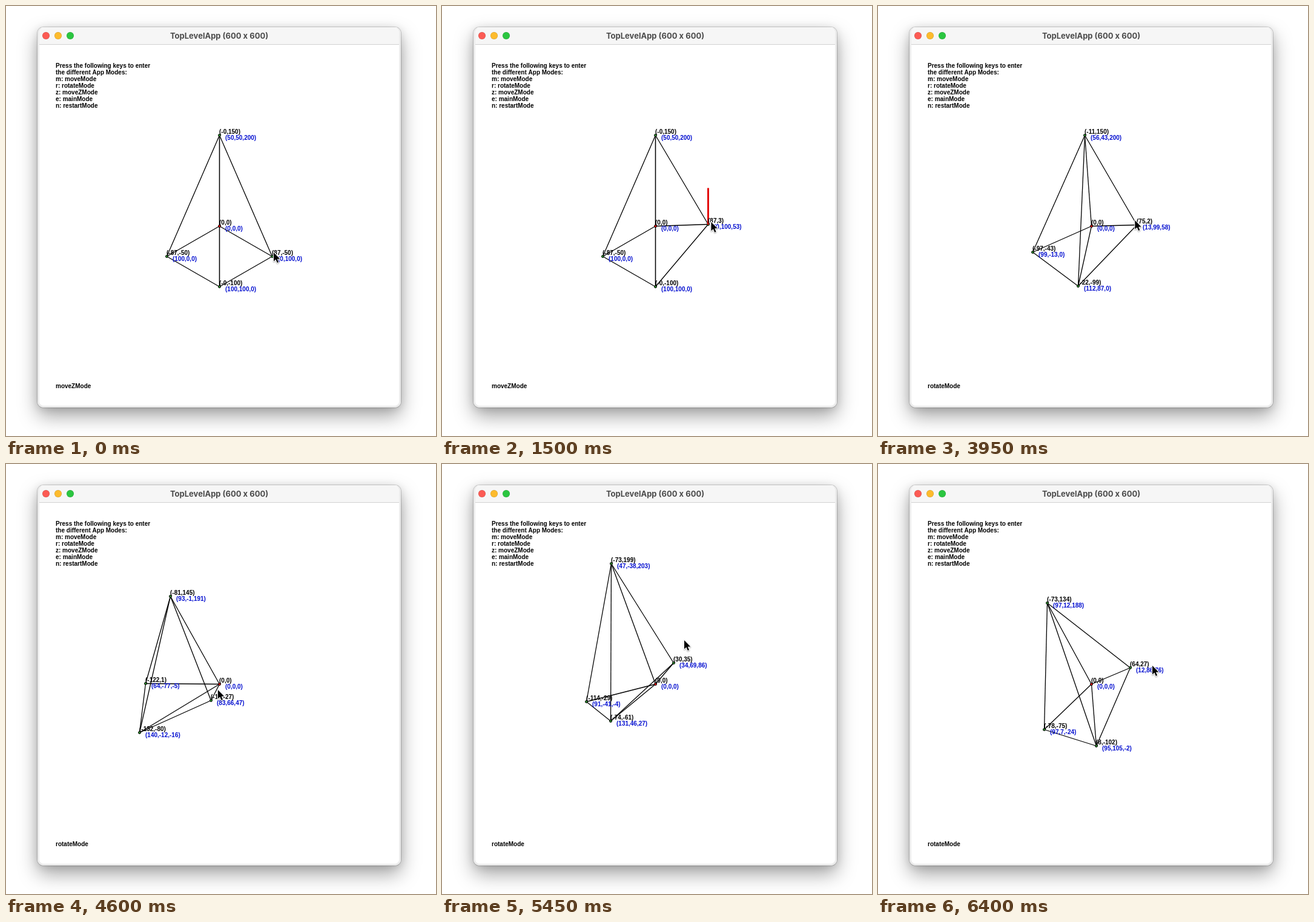
An HTML page with a canvas that plays this animation: 710 px wide and 710 px high, repeating every 6450 ms.

```html
<!DOCTYPE html>
<html lang="en">
<head>
<meta charset="utf-8">
<title>TopLevelApp</title>
<style>
  html, body { margin: 0; width: 100%; height: 100%; overflow: hidden; background: #fff; }
  #win, #shade {
    position: absolute; left: 52px; top: 35px; width: 600px; height: 628px;
    box-sizing: border-box; border-radius: 10px;
  }
  #win { overflow: hidden; border: 3px solid #ececec; border-top: 0; background: #fff; }
  #shade {
    box-shadow: 0 0 0 1px rgba(0,0,0,.16), 0 14px 32px rgba(0,0,0,.36), 0 2px 14px rgba(0,0,0,.12);
  }
  #bar {
    position: absolute; left: -3px; top: 0; width: 600px; height: 29px; box-sizing: border-box;
    background: #f6f6f6; border-bottom: 1px solid #d2d2d2; text-align: center;
    font: 700 13px/28px Inter, "Open Sans", sans-serif; color: #4b4b4b;
  }
  #bar i {
    position: absolute; top: 8px; width: 12px; height: 12px; border-radius: 50%;
    box-shadow: inset 0 0 0 .5px rgba(0,0,0,.2);
  }
  canvas { position: absolute; left: 0; top: 0; width: 710px; height: 710px; }
</style>
</head>
<body>
<div id="shade"></div>
<div id="win">
  <div id="bar">
    <i style="left:8px;background:#fc5b54"></i>
    <i style="left:28px;background:#fdbb2d"></i>
    <i style="left:48px;background:#2bc640"></i>
    TopLevelApp (600 x 600)
  </div>
</div>
<canvas id="stage" width="710" height="710"></canvas>
<script>
const ctx = document.getElementById('stage').getContext('2d');
const LOOP = 6450, STEP = 50, TURN_START = 3950;
const OX = 352.5, OY = 363.5, COS30 = Math.sqrt(3) / 2;
const BLACK = '#000', BLUE = '#0510d0';

const HELP = [
  'Press the following keys to enter', 'the different App Modes:',
  'm: moveMode', 'r: rotateMode', 'z: moveZMode', 'e: mainMode', 'n: restartMode'
];

// Vertices: origin, left, right, front, apex; every pair but left-right is joined
const EDGES = [];
for (let i = 0; i < 5; i++)
  for (let j = i + 1; j < 5; j++)
    if (i !== 1 || j !== 2) EDGES.push([i, j]);

// Key poses of the drag: time, yaw, tilt x, tilt y, mouse y
const DRAG = [
  [TURN_START, -0.127, 0, 0, 354],
  [4600, -0.871, 0.114, 0.027, 373],
  [4850, -0.95, 0.13, 0.02, 378],
  [5450, -0.425, -0.092, -0.302, 291],
  [6000, 0.17, 0.13, -0.27, 297],
  [6400, 0.044, 0.245, -0.2005, 333]
];

const clamp = u => Math.min(1, Math.max(0, u));

// Slope at key i, flat at turning points and ends
function slope(keys, i, k) {
  const a = keys[i - 1], b = keys[i], c = keys[i + 1];
  if (!a || !c || (b[k] - a[k]) * (c[k] - b[k]) <= 0) return 0;
  return (c[k] - a[k]) / (c[0] - a[0]);
}

// Smooth cubic through the keys
function track(keys, t) {
  let i = 0;
  while (i < keys.length - 2 && keys[i + 1][0] < t) i++;
  const p = keys[i], q = keys[i + 1], d = q[0] - p[0];
  const u = clamp((t - p[0]) / d), v = 1 - u;
  return p.slice(1).map((x, j) => {
    const k = j + 1;
    return x * (1 + 2 * u) * v * v + q[k] * u * u * (3 - 2 * u) +
      d * u * v * (slope(keys, i, k) * v - slope(keys, i + 1, k) * u);
  });
}

// Yaw about z, then the shortest tilt that brings z to (a, b, c)
function rotate([x, y, z], yaw, a, b) {
  const c = Math.sqrt(1 - a * a - b * b), s = Math.sin(yaw), k = Math.cos(yaw);
  const u = x * k - y * s, v = x * s + y * k;
  const m = (a * u + b * v) / (1 + c);
  return [u - a * m + a * z, v - b * m + b * z, c * z - a * u - b * v];
}

const project = ([x, y, z]) => [(y - x) * COS30, z - (x + y) / 2];
const fmt = vals => '(' + vals.map(v => v.toFixed(0)).join(',') + ')';

// Pose, lift of the right vertex and mouse position
function stateAt(t) {
  const u = clamp((t - 500) / 1350);
  const lift = t < 50 ? 0 : Math.round(1 + 57 * Math.sin(u * Math.PI / 2));
  if (t < 2700) return { lift, pose: [0, 0, 0], mouse: [442 + 6 * u ** 3, 407 - 0.95 * lift] };
  if (t < TURN_START) return { lift, pose: [0, 0, 0], mouse: [438, 353] };
  const [yaw, a, b, my] = track(DRAG, t);
  return { lift, pose: [yaw, a, b], mouse: [437 + 100 * yaw + Math.max(0, t - 4600) / 155, my] };
}

function text(str, x, y, color = BLACK) {
  ctx.fillStyle = color;
  ctx.fillText(str, x, y);
}

function line(x1, y1, x2, y2, color, width) {
  ctx.strokeStyle = color;
  ctx.lineWidth = width;
  ctx.beginPath();
  ctx.moveTo(x1, y1);
  ctx.lineTo(x2, y2);
  ctx.stroke();
}

function dot(x, y, color) {
  ctx.beginPath();
  ctx.arc(x, y, 2, 0, 2 * Math.PI);
  ctx.fillStyle = color;
  ctx.fill();
  ctx.strokeStyle = BLACK;
  ctx.lineWidth = 1;
  ctx.stroke();
}

const ARROW = new Path2D('M0 0V14.5L3.4 11.5L5.8 17L8.1 16L5.8 10.7L10.3 10.4Z');

function cursor(x, y) {
  ctx.save();
  ctx.translate(x, y);
  ctx.shadowColor = 'rgba(0,0,0,.35)';
  ctx.shadowBlur = 2;
  ctx.shadowOffsetY = 1;
  ctx.strokeStyle = '#fff';
  ctx.lineWidth = 2;
  ctx.lineJoin = 'round';
  ctx.stroke(ARROW);
  ctx.shadowColor = 'transparent';
  ctx.fillStyle = BLACK;
  ctx.fill(ARROW);
  ctx.restore();
}

function draw(t) {
  ctx.clearRect(0, 0, 710, 710);
  ctx.font = 'bold 10px "Liberation Sans", Arial, sans-serif';
  HELP.forEach((row, i) => text(row, 82, 102 + 11 * i));
  text(t < 3000 ? 'moveZMode' : 'rotateMode', 82, 631);

  const { lift, pose, mouse } = stateAt(t);
  const solid = [[0, 0, 0], [100, 0, 0], [0, 100, lift], [100, 100, 0], [50, 50, 200]]
    .map(p => rotate(p, ...pose));
  const flat = solid.map(project);
  const at = flat.map(([x, y]) => [OX + Math.round(x), OY - Math.round(y)]);

  for (const [i, j] of EDGES) line(...at[i], ...at[j], BLACK, 1.3);
  at.forEach(([x, y], i) => dot(x, y, i ? '#2c8a2c' : '#e01010'));
  if (t >= 50 && t < 1950) {
    const [x, y] = at[2];
    line(x, y + 0.5, x, y - 60, '#e30808', 3);
  }
  at.forEach(([x, y], i) => {
    const [fx, fy] = flat[i];
    // the app shows a signed zero on the vertical axis
    text(fmt([i ? fx - 1e-9 : 0, fy]), x - 0.5, y - 2.5);
    text(fmt(solid[i]), x + 9.5, y + 7.5, BLUE);
  });
  cursor(...mouse);
}

const start = performance.now();
function tick() {
  const t = (performance.now() - start) % LOOP;
  draw(Math.floor(t / STEP) * STEP);
  requestAnimationFrame(tick);
}
tick();
</script>
</body>
</html>
```
